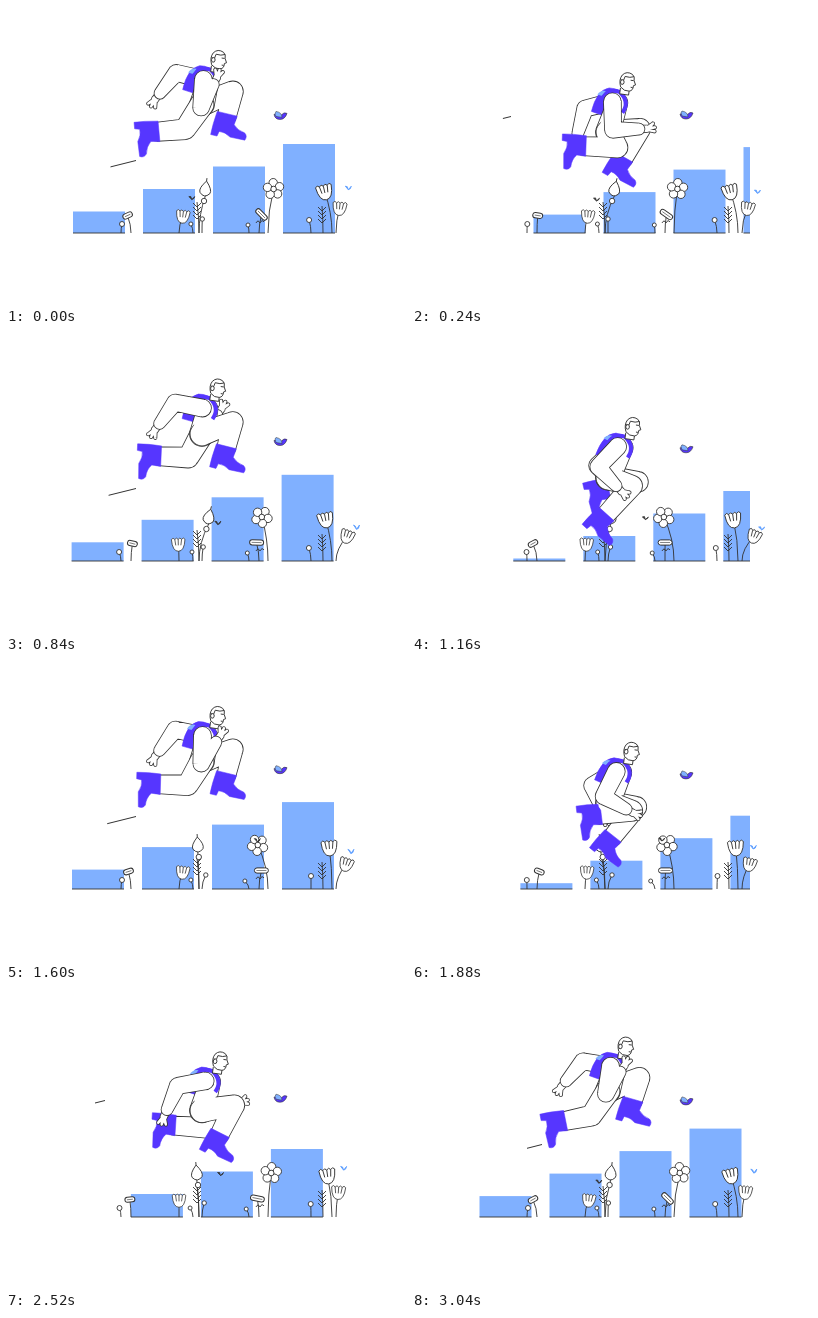
Animation of 400 by 300 pixels, one loop 3.08 s. Source, as an HTML page:

```html
<!DOCTYPE html>
<html>
<head>
<meta charset="utf-8">
<style>
html, body { margin: 0; width: 100%; height: 100%; overflow: hidden; background: #fff; }
svg { display: block; width: 400px; height: 300px; }
</style>
</head>
<body>
<svg id="stage" viewBox="0 0 400 300"></svg>
<script>
const LOOP = 3080, CYCLE = LOOP / 2, STRIDE = LOOP / 4;
const INK = '#333', PURPLE = '#5636ff', BLUE = '#80b0ff', GROUND = 227;
const stage = document.getElementById('stage');
const { sin, cos, atan2, hypot, sqrt, max, min, PI } = Math;

const num = v => v.toFixed(1);
const pt = (x, y) => num(x) + ' ' + num(y);
const degrees = a => a * 180 / PI;
const sway = (t, mid, reach, peak, period = LOOP) => mid + reach * cos(2 * PI * (t - peak) / period);

const path = (d, fill = 'none', stroke = INK, width = .9) =>
  `<path d="${d}" fill="${fill}" stroke="${stroke}" stroke-width="${width}"/>`;
const line = (x1, y1, x2, y2, w = .9) => path(`M${pt(x1, y1)}L${pt(x2, y2)}`, 'none', INK, w);
const oval = (x, y, rx, ry = rx) =>
  `<ellipse cx="${num(x)}" cy="${num(y)}" rx="${rx}" ry="${ry}" fill="#fff" stroke="${INK}" stroke-width=".9"/>`;
const place = (x, y, angle, body) => `<g transform="translate(${pt(x, y)}) rotate(${num(angle)})">${body}</g>`;

// A tapered segment; all parts wind the same way so that they merge.
const disc = (x, y, r) => `M${pt(x - r, y)}a${r} ${r} 0 1 1 ${2 * r} 0a${r} ${r} 0 1 1 ${-2 * r} 0z`;
function capsule([x1, y1, r1], [x2, y2, r2]) {
  const len = hypot(x2 - x1, y2 - y1) || 1, nx = (y2 - y1) / len, ny = (x1 - x2) / len;
  return disc(x1, y1, r1) + disc(x2, y2, r2) +
    `M${pt(x1 + nx * r1, y1 + ny * r1)}L${pt(x2 + nx * r2, y2 + ny * r2)}` +
    `L${pt(x2 - nx * r2, y2 - ny * r2)}L${pt(x1 - nx * r1, y1 - ny * r1)}z`;
}
const chain = (...joints) => joints.slice(1).map((j, i) => capsule(joints[i], j)).join('');
const solid = d => path(d, '#fff', 'none', 0);
const outlined = d => path(d, '#fff', INK, 1.6) + solid(d);

// Middle joint of a two-part limb that bends backwards.
function elbowOf([x1, y1], [x2, y2], upper, lower) {
  const dx = x2 - x1, dy = y2 - y1, d = hypot(dx, dy);
  const along = min(upper, (d * d + upper * upper - lower * lower) / (2 * d));
  const out = sqrt(max(0, upper * upper - along * along));
  return [x1 + (dx * along - dy * out) / d, y1 + (dy * along + dx * out) / d];
}

function leg(hip, t) {
  const a = 2 * PI * t / CYCLE;
  const knee = [hip[0] + 17 + 24 * cos(a + .1) - 10 * cos(2 * a), hip[1] + 6 - 19 * cos(a + .08)];
  const ankle = [190 + 35 * cos(a) - 4 * cos(2 * a), 143 - 26 * cos(2 * a - .25) + 13 * sin(a) - 8 * cos(a)];
  const angle = degrees(atan2(ankle[1] - knee[1], ankle[0] - knee[0])) - 90;
  const boot = 'M-10.5 -2L10 -2L9 7Q14 12 21 12.5Q25 15 23 19.5L8 20Q2 16 -4 17L-5 22L-11.5 22Q-12 12 -10.5 -2z';
  return outlined(chain([...hip, 11.5], [...knee, 10], [...ankle, 9])) +
    place(...ankle, angle, path(boot, PURPLE, PURPLE, .5));
}

function arm(shoulder, t) {
  const a = 2 * PI * t / CYCLE;
  const hand = [194 + 43 * cos(a) - 14 * cos(2 * a) - 12 * cos(3 * a), 120 - 38 * cos(2 * a - .15) - 11 * cos(a)];
  const elbow = elbowOf(shoulder, hand, 28, 34);
  const aim = atan2(hand[1] - elbow[1], hand[0] - elbow[0]);
  const toward = (length, turn = 0) => [hand[0] + length * cos(aim + turn), hand[1] + length * sin(aim + turn)];
  const wrist = toward(-8);
  const fingers = [-.7, -.15, .35].map(turn => chain([...hand, 2], [...toward(8, turn), 1.2])).join('');
  return outlined(chain([...wrist, 3.5], [...hand, 3.2]) + fingers) +
    outlined(chain([...shoulder, 8.5], [...elbow, 8], [...wrist, 5.5]));
}

function runner(t) {
  const hx = sway(t, 216.5, 5, 460, STRIDE), hy = sway(t, 73, -20, 30, STRIDE);
  const hip = [196, sway(t, 121, -23, 20, STRIDE)];
  const chest = [hx - 10, hy + 21], shoulder = [hx - 15, hy + 20];
  const lean = degrees(atan2(hx - 6 - hip[0], hip[1] - hy - 12));
  const pack = place(hx - 21, hy + 20, lean,
    path('M-11 14Q-13 -8 -2 -14Q8 -17 16 -11L10 14z', PURPLE, PURPLE, .5) +
    path('M-11 -4Q-9 -10 -4 -10L-6 -4z', BLUE, 'none', 0));
  const strap = path(`M${pt(hx - 27, hy + 20)}Q${pt(hx - 20, hy + 6)} ${pt(hx - 8, hy + 10)}` +
    `Q${pt(hx + 3, hy + 20)} ${pt(hx - 5, hy + 31)}`, 'none', PURPLE, 4);
  const head = place(hx, hy, 8,
    path('M-6 7L-6 13L3 13L3 8', '#fff') +
    path('M-6 6Q-9 -1 -6 -6Q-2 -11 4 -8Q7 -6 6.5 -2L8.5 2L6.5 3Q7 8 3 9Q-2 10 -6 6z', '#fff') +
    path('M-7 -1L-4 -1L-3 -5Q2 -4 6 -6M3 -2h3M4 5h2') + oval(-5, 1, 1.8, 2.3));
  return arm(shoulder, t + STRIDE) + pack + leg(hip, t) + outlined(chain([...chest, 10], [...hip, 12])) +
    leg(hip, t + STRIDE) + solid(chain([...chest, 9], [...hip, 10])) + strap + head + arm(shoulder, t);
}

// Steps slide one place per stride and dip under the landing foot.
function bars(p) {
  const ease = sway(p, .5, -.5, 0, LOOP / 2), dip = sway(p, 15, -15, 0, STRIDE);
  let out = '';
  for (let k = 0; k < 5; k++) {
    const x = 67 + 70 * (k - ease), top = 138 + 22.5 * (3 - k + ease) + dip;
    if (top > 226.5 || x > 333) continue;
    out += `<rect x="${num(x)}" y="${num(top)}" width="52" height="${num(GROUND - top)}" fill="${BLUE}"/>` +
      line(x, GROUND, x + 52, GROUND);
  }
  return `<g clip-path="url(#field)">${out}</g>`;
}

const stem = (x, y, base) => path(`M${base} ${GROUND}Q${pt(base, (y + GROUND) / 2)} ${pt(x, y)}`);
const bud = (x, y, base, r = 2.5) => stem(x, y, base) + oval(x, y, r);
const tulip = (x, y, base, size) => stem(x, y, base) + place(x, y, (x - base) * 1.8,
  `<g transform="scale(${size})">` +
  path('M-8 -6Q-6 -9 -4 -6Q-2 -9 0 -6Q2 -9 4 -6Q6 -9 8 -6Q7 8 0 8Q-7 8 -8 -6zM-4 -6L-3 1M0 -6V1M4 -6L3 1', '#fff') + '</g>');
function fern(x, y, base) {
  let d = '';
  for (let i = 0; i < 4; i++) d += `M${x - 4} ${y - 6 + i * 4}L${x} ${y - 2 + i * 4}L${x + 4} ${y - 6 + i * 4}`;
  return stem(x, y - 7, base) + path(d);
}
const pill = (x, y, angle, w) => place(x, y, angle,
  `<rect x="${-w}" y="-2.6" width="${2 * w}" height="5.2" rx="2.6" fill="#fff" stroke="${INK}"/>` + line(2 - w, 0, w - 2, 0, .6));

function blossom(x, y) {
  let out = stem(x, y, 262);
  for (let i = 0; i < 5; i++) {
    const a = i * PI * .4 - (x - 259) * .05 - 1.2;
    out += oval(x + 6.3 * cos(a), y + 6.3 * sin(a), 4.2);
  }
  return out + oval(x, y, 2.8);
}

function garden(t) {
  const tip = sway(t, 124.5, 4.5, 560, CYCLE), dropX = sway(t, 196, 8, 560), leafX = sway(t, 253, 2.5, 0, CYCLE);
  const drop = stem(dropX, 190, 193) + place(dropX, 184, (dropX - 194) * 1.5,
    path('M0 -9Q7 -1 5 3Q0 9 -5 3Q-7 -1 0 -9zM0 -9V-12', '#fff')) + oval(dropX * .7 + 58.5, 195, 2.7);
  return stem(tip, 210, 125) + pill(tip, 209.5, (tip - 124) * 8 - 5, 5) + bud(sway(t, 114.5, 1.5, 0, CYCLE), 218, 115) +
    tulip(sway(t, 174.5, 2.3, 0, CYCLE), 210.5, 173, .85) + fern(191, 203, 193) + drop +
    bud(sway(t, 185, 1, 800), 218, 187, 2) + bud(sway(t, 198, 2, 1800), 213, 196, 2.2) +
    blossom(sway(t, 259.5, 8.5, -150), 183) +
    stem(leafX, 209, 253) + pill(leafX, 208.5, 45 * sway(t, .5, .5, 0) ** 4, 7) + path('M250 217q2 -4 4 0q2 -4 4 -1') +
    bud(sway(t, 240.5, 1.8, 300), 219, 243, 2) + bud(sway(t, 304, 1.5, 2000), 214, 305) + fern(316, 207, 317) +
    tulip(sway(t, 321, 2.8, 1850), 186, 326, 1) + tulip(sway(t, 337, 5, 1150), 202.5, 330, .88);
}

function streak(x, y, length) {
  return length > 2 ? line(x, y, x - length, y + length * .25, 1) : '';
}
const trails = p => streak(130, 154.5, 30 * sway(p, 0, 1, 40, STRIDE) ** 3) +
  streak(99, 110.5, 10 * sway(p, 0, 1, 210, STRIDE) ** 7);

const bird = t => place(274, sway(t, 112, 5, 510, STRIDE), 0,
  path('M-6 -1Q-3 -2 1 0Q4 -4 7 -2Q5 4 0 4Q-5 4 -6 -1z', PURPLE, INK, .6) +
  path(`M-4 1Q-6 ${num(sway(t, -3, 2, 0, 310))} -4 -4Q2 -3 2 2z`, BLUE, INK, .5));

const flyer = (x, y, flap, color) =>
  place(x, y, 0, path(`M0 2L-3 ${num(-flap)}L-1 -1zM0 2L3 ${num(-flap)}L2 1z`, color, color, .8));

function draw(time) {
  const t = Math.floor((time % LOOP) / 40) * 40, p = t % STRIDE, flap = 1.5 + sin(t / 40);
  stage.innerHTML = '<defs><clipPath id="field"><rect x="62" y="100" width="276" height="128"/></clipPath></defs>' +
    bars(p) + garden(t) + trails(p) + runner(t) + bird(t) +
    flyer(sway(t, 344, 6.5, 900), sway(t, 186, 8, 1050), flap, '#5a9cff') +
    flyer(sway(t, 218, 34, 1700), sway(t, 185, 8, 300), flap * .6, INK);
}

const start = performance.now();
(function tick() {
  draw(performance.now() - start);
  requestAnimationFrame(tick);
})();
</script>
</body>
</html>
```
